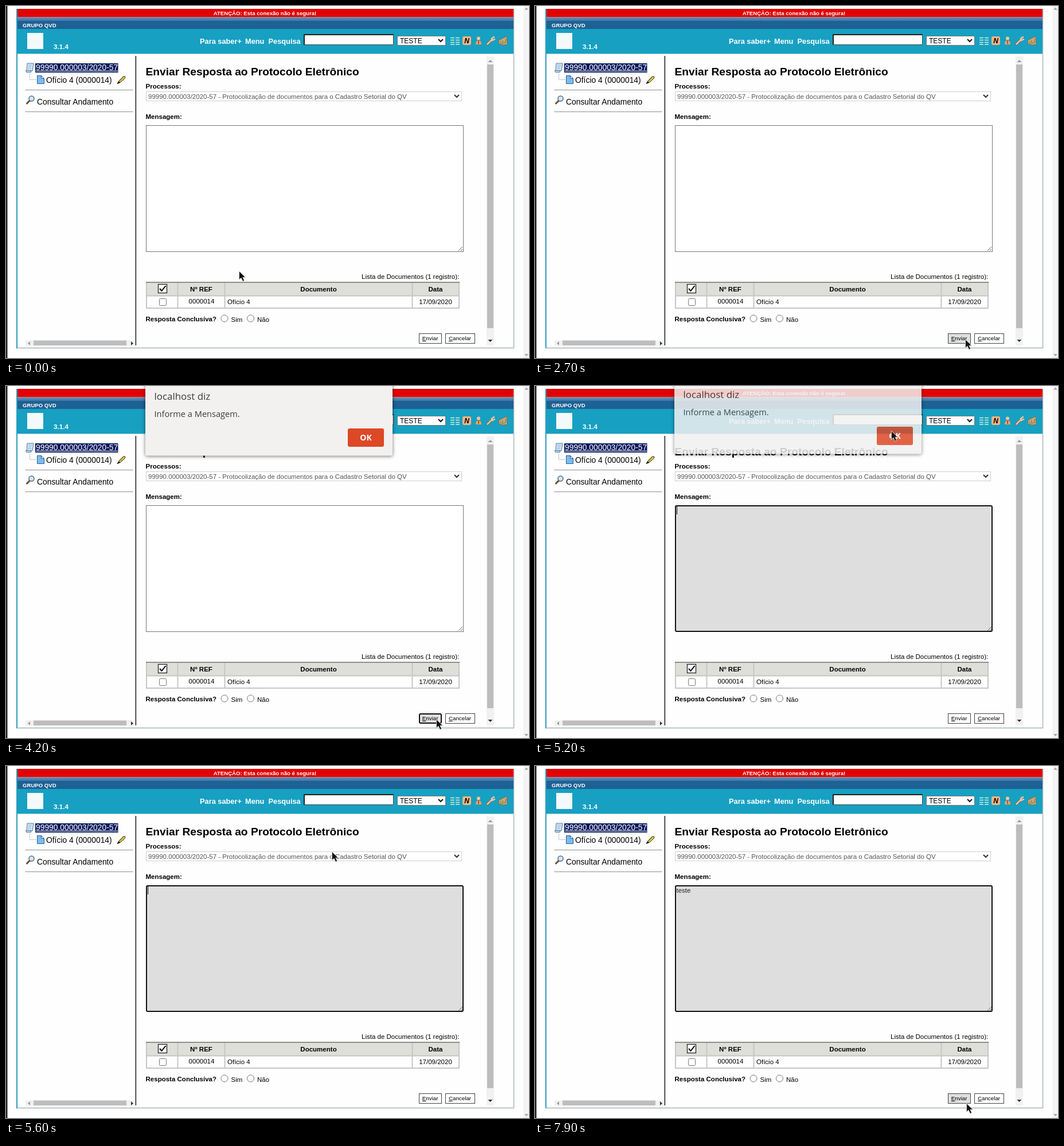
An HTML page for the animation above (8 s loop, 912x614 px).

```html
<!DOCTYPE html>
<html lang="pt-BR">
<head>
<meta charset="utf-8">
<title>Enviar Resposta</title>
<style>
html, body { margin: 0; width: 100%; height: 100%; overflow: hidden; background: #fefefe; }
svg { display: block; width: 912px; height: 614px; font-family: "Liberation Sans", Arial, sans-serif; font-size: 11.52px; }
text { white-space: pre; }
.b { font-weight: bold; }
.m { text-anchor: middle; }
.w { fill: #fff; }
.menu { font-size: 12.8px; }
.tree { font-size: 13.85px; }
.btn { font-size: 9.8px; }
.dots { stroke: #222; stroke-dasharray: 1 1; }
.line { fill: none; stroke: #c6c6c6; stroke-width: 2; }
#dialog { font-family: "Open Sans", "Noto Sans", sans-serif; fill: #3c3c3c; }
#panel { filter: drop-shadow(0 1px 3px rgba(0, 0, 0, .55)); }
</style>
</head>
<body>
<svg viewBox="0 0 912 614">
  <defs>
    <linearGradient id="strip" x2="0" y2="1"><stop stop-color="#6a8fb5"/><stop offset="1" stop-color="#3a76a6"/></linearGradient>
  </defs>
  <rect width="912" height="614" fill="#fefefe"/>
  <rect width="2.5" height="614" fill="#222"/>
  <rect x="902" width="10" height="614" fill="#f4f4f4"/>
  <path d="M904 6.500h7l-3.500-4zM904 607h7l-3.500 4z" fill="#a5a5a5"/>

  <!-- page frame and header -->
  <path d="M18 596.500H886M885.500 5V597" stroke="#bcc6c8" stroke-width="2"/>
  <path d="M19 5V597" stroke="#2f9cbc" stroke-width="2"/>
  <rect x="20" y="5" width="865" height="14.500" fill="#e30000"/>
  <rect x="20" y="19.500" width="865" height="6.500" fill="url(#strip)"/>
  <rect x="20" y="26" width="865" height="14" fill="#1e6194"/>
  <rect x="20" y="40" width="865" height="43" fill="#17a0c2"/>
  <rect x="20" y="83" width="865" height="1" fill="#a9d6e2"/>
  <text class="b m w" x="451.500" y="16" font-size="9.600">ATENÇÃO: Esta conexão não é segura!</text>
  <text class="b w" x="29" y="36.500" font-size="9.600">GRUPO QVD</text>
  <rect x="37" y="47" width="28" height="28" fill="#f4fafb"/>
  <text class="b w" x="83" y="75" font-size="11.700">3.1.4</text>
  <g class="b w menu">
    <text x="338" y="66">Para saber+</text><text x="417" y="66">Menu</text><text x="457.500" y="66">Pesquisa</text>
  </g>
  <rect x="519" y="49" width="157" height="19" fill="#fff"/>
  <path d="M520 68V50H676" fill="none" stroke="#222" stroke-width="2"/>
  <path d="M520 67.500H675.500V50" fill="none" stroke="#444"/>
  <rect x="682.500" y="52.500" width="84" height="16" fill="#fff" stroke="#767676"/>
  <text x="687" y="65" font-size="12">TESTE</text>
  <path d="M754 58l4 4 4-4" fill="none" stroke="#111" stroke-width="2"/>

  <!-- toolbar icons -->
  <path d="M775 55.500h7M784 55.500h7M775 59.500h7M784 59.500h7M775 63.500h7M784 63.500h7M775 67h7M784 67h7" stroke="#d6f0d8" stroke-width="1.600"/>
  <rect x="796" y="53" width="15" height="15" rx="3" fill="#f5b483"/>
  <text class="b m" x="803.500" y="65" font-size="12" font-style="italic">N</text>
  <circle cx="824" cy="56.500" r="3" fill="#f6c79c"/>
  <path d="M819 67q0-7 5-7t5 7z" fill="#f0a35e"/><path d="M824 60v6" stroke="#a33" stroke-width="1.500"/>
  <path d="M839.500 66.500l7-7" stroke="#8b5a35" stroke-width="4" stroke-linecap="round"/>
  <path d="M839.500 66.500l8-8M851 54l-4 3 1 3 4-2" fill="none" stroke="#f2c6a0" stroke-width="2.500" stroke-linecap="round"/>
  <path d="M859 60l6-3 8-4 1 14-7 1-7-2z" fill="#d9a876" stroke="#8c6846"/>
  <path d="M862 61l2 5M866 59v6l5-1v-7" fill="none" stroke="#6f8f5a" stroke-width="1.500"/>

  <!-- side tree -->
  <path d="M37 100h11l-2 13H36z" fill="#d3e6f6" stroke="#51779c"/>
  <path d="M34.500 112.500h9v3h-8z" fill="#b8d5ee" stroke="#51779c"/>
  <path d="M39 103h6M38.500 106h6M38 109h6" stroke="#87aed0"/>
  <rect x="51" y="100" width="144.500" height="16" fill="#0a1a5c"/>
  <text class="tree w" x="52" y="112">99990.000003/2020-57</text>
  <path d="M52 113.500H195" stroke="#fff"/>
  <path d="M41.500 118V128.500H53" class="dots" fill="none" style="stroke:#888"/>
  <path d="M54.500 121.500h7l5 5v9h-12z" fill="#7cbcec" stroke="#245f98"/>
  <path d="M61.500 121.500v5h5z" fill="#dceefb" stroke="#245f98"/>
  <text class="tree" x="70" y="133.500">Ofício 4 (0000014)</text>
  <path d="M194 135.500l3-5 8-8 3 1-1 3-8 7z" fill="#e5d23d" stroke="#222"/>
  <path d="M194 135.500l3-4 2 2z"/><path d="M198 131l7-7" stroke="#8a7a17"/>
  <path d="M34 146.500H222M34 184.500H222" class="dots"/>
  <path d="M36.500 170l5-5" stroke="#6b4a32" stroke-width="3" stroke-linecap="round"/>
  <circle cx="44.500" cy="161.500" r="4.500" fill="#d5e6f5" stroke="#566a80" stroke-width="1.500"/>
  <text class="tree" x="54" y="172">Consultar Andamento</text>
  <path d="M225.500 87V592" stroke="#aaa"/><path d="M226.500 87V592" stroke="#333" stroke-width="1.400"/>

  <!-- inner scrollbars -->
  <rect x="34" y="583" width="190" height="10" fill="#f1f1f1"/>
  <rect x="48" y="583.500" width="162" height="8.500" fill="#bdbdbd"/>
  <path d="M42 585v7l-4-3.500z" fill="#9b9b9b"/><path d="M218 585v7l4-3.500z" fill="#333"/>
  <rect x="838" y="88" width="13" height="504" fill="#f1f1f1"/>
  <rect x="839" y="102" width="11" height="460" fill="#bdbdbd"/>
  <path d="M840.500 98h8l-4-4z" fill="#9b9b9b"/><path d="M840.500 582h8l-4 4z" fill="#333"/>

  <!-- form -->
  <text class="b" x="243.500" y="121" font-size="19.200">Enviar Resposta ao Protocolo Eletrônico</text>
  <text class="b" x="243.500" y="144">Processos:</text>
  <rect x="244.500" y="149.500" width="550" height="16" fill="#fff" stroke="#cfcfcf"/>
  <text x="248" y="161.500" fill="#555">99990.000003/2020-57 - Protocolização de documentos para o Cadastro Setorial do QV</text>
  <path d="M782 155l4 4 4-4" fill="none" stroke="#333" stroke-width="2"/>
  <text class="b" x="243.500" y="197">Mensagem:</text>
  <rect id="area"/>
  <path d="M789 427l7-7M793 427l3-3" stroke="#666"/>
  <text id="typed" x="246.500" y="221" fill="#222"></text>
  <rect id="caret" y="210" width="1" height="14"/>

  <text x="620" y="475.500">Lista de Documentos (1 registro):</text>
  <rect x="245" y="483" width="545" height="22" fill="#dfdfda"/>
  <path class="line" d="M245 482V527H790V482M244 505.500H791M299.500 483V527M381.500 483V527M708.500 483V527"/>
  <path d="M244 482H791" stroke="#686c63" stroke-width="1.600"/>
  <rect x="265.500" y="485.500" width="15" height="15" fill="#fff" stroke="#222" stroke-width="1.300"/>
  <path d="M268 493l3.500 4 7-9" fill="none" stroke="#000" stroke-width="2"/>
  <rect x="267.500" y="510.500" width="12" height="12" rx="2" fill="#fff" stroke="#767676"/>
  <g class="b m">
    <text x="340.500" y="497.500">Nº REF</text><text x="545" y="497.500">Documento</text><text x="749" y="497.500">Data</text>
  </g>
  <text class="m" x="341" y="519">0000014</text>
  <text x="386" y="520">Ofício 4</text>
  <text class="m" x="749" y="520">17/09/2020</text>
  <text class="b" x="243.500" y="550">Resposta Conclusiva?</text>
  <circle cx="381" cy="545" r="6" fill="#fff" stroke="#767676"/><text x="392.500" y="550.500">Sim</text>
  <circle cx="426.500" cy="545" r="6" fill="#fff" stroke="#767676"/><text x="438" y="550.500">Não</text>
  <rect id="send"/>
  <rect id="cancel" x="766.500" y="571.500" width="51" height="17" stroke="#444"/>
  <g class="btn m">
    <text x="739.700" y="583"><tspan text-decoration="underline">E</tspan>nviar</text>
    <text x="791.500" y="583"><tspan text-decoration="underline">C</tspan>ancelar</text>
  </g>

  <g id="dialog">
    <rect id="panel" x="243" y="-20" width="431" height="141.500" rx="3" fill="#f2f1f0"/>
    <text x="258.500" y="24" font-size="16.900">localhost diz</text>
    <text x="258.500" y="54" font-size="14.600">Informe a Mensagem.</text>
    <rect x="596" y="74" width="63" height="32" rx="3" fill="#dd4827"/>
    <text class="b m w" x="627.500" y="95" font-size="14">OK</text>
  </g>

  <path id="arrow" d="M.500 .500V15.500L4 12.300 6.800 18.300 9.600 17 6.900 11.300H11.500z" fill="#111" stroke="#ddd" stroke-width=".900"/>
  <g id="beam" fill="none">
    <path d="M-3 -7.500H3M-3 7.500H3M0 -7.500V7.500" stroke="#fff" stroke-width="3"/>
    <path d="M-3 -7.500H-1L0 -6.500 1 -7.500H3M-3 7.500H-1L0 6.500 1 7.500H3M0 -6.500V6.500" stroke="#222" stroke-width="1.300"/>
  </g>
</svg>
<script>
const LOOP = 8000, STEP = 100;
const el = id => document.getElementById(id);
const set = (id, attrs) => { for (const k in attrs) el(id).setAttribute(k, attrs[k]); };
const show = (id, on) => set(id, { visibility: on ? "visible" : "hidden" });

// pointer stops: time, x, y
const path = [
  [0, 406, 462], [200, 406, 462], [300, 404, 444], [600, 393, 279], [1700, 393, 279],
  [1800, 583, 469], [1900, 793, 587], [2000, 793, 587], [2100, 783, 585], [2300, 748, 578],
  [2600, 748, 578], [2700, 750, 581], [4500, 750, 581], [4600, 742, 545], [4800, 665, 215],
  [5000, 621, 78], [5300, 621, 78], [5400, 603, 103], [5500, 603, 103], [5800, 498, 240],
  [7000, 498, 240], [7400, 725, 560], [7500, 743, 589], [7600, 743, 589], [7700, 752, 588], [LOOP, 752, 588]
];
// dialog states: start time, opacity, vertical shift
const fades = [[0, 0, 0], [4100, .55, -8.5], [4200, 1, 0], [5200, .85, -3], [5300, .55, -8.5], [5400, 0, 0]];
// typed length: start time, letters
const keys = [[0, 0], [6500, 2], [6600, 3], [6800, 4], [7000, 5]];

const last = (list, t) => list.filter(s => s[0] <= t).pop();
const within = (t, a, b) => t >= a && t < b;

// border drawn inside the box: 1 px plain, 2 px rounded when focused
function field(id, [x, y, w, h], focus, fill, edge) {
  const s = focus ? 2 : 1;
  set(id, {
    x: x + s / 2, y: y + s / 2, width: w - s, height: h - s, rx: focus ? 2 : 0,
    fill, stroke: focus ? "#111" : edge, "stroke-width": s
  });
}

function pointer(t) {
  const i = path.findIndex(p => p[0] > t);
  const [t0, x0, y0] = path[i - 1], [t1, x1, y1] = path[i];
  const k = (t - t0) / (t1 - t0);
  return [Math.round(x0 + (x1 - x0) * k), Math.round(y0 + (y1 - y0) * k)];
}

function draw(ms) {
  const t = Math.floor(ms / STEP) * STEP;
  const [x, y] = pointer(t);
  const modal = within(t, 4100, 5400);
  const beam = !modal && (within(y, 208, 429) || t === 1800);
  show("beam", beam);
  show("arrow", !beam);
  set(beam ? "beam" : "arrow", { transform: `translate(${x} ${y})` });

  const focus = t >= 5200;
  field("area", [244, 208, 554, 221], focus, focus ? "#dedede" : "#fff", "#767676");
  el("typed").textContent = "teste".slice(0, last(keys, t)[1]);
  show("caret", within(t, 5200, 5700) || within(t, 6500, 7500));
  set("caret", { x: 247 + Math.round(el("typed").getComputedTextLength()) });

  const hot = t === 1800 || within(t, 2200, 5200) || t >= 7900;
  field("send", [720, 571, 40, 18], within(t, 4000, 5200), hot ? "#dfdfdf" : "#fff", "#444");
  set("cancel", { fill: within(t, 1900, 2200) ? "#dfdfdf" : "#fff" });

  const [, alpha, dy] = last(fades, t);
  show("dialog", alpha > 0);
  set("dialog", { opacity: alpha, transform: `translate(0 ${dy})` });
}

const start = performance.now();
function tick() {
  draw((performance.now() - start) % LOOP);
  requestAnimationFrame(tick);
}
tick();
</script>
</body>
</html>
```
